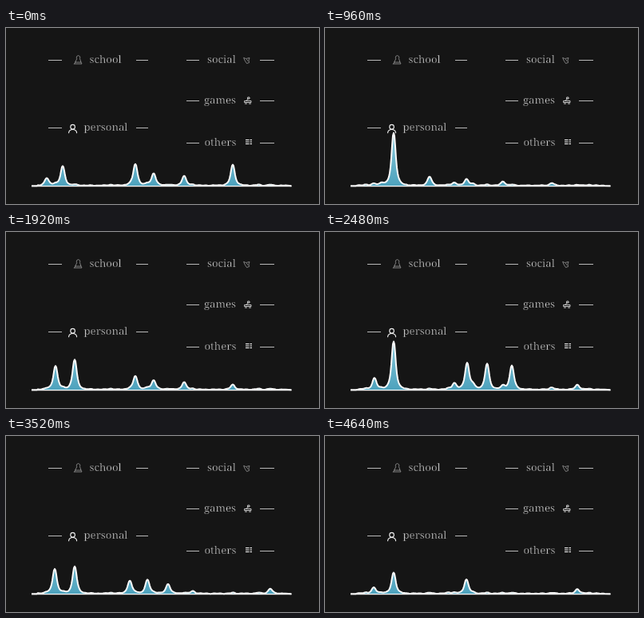
These frames come from a looping animation (392x221 px, 4.8 s). An HTML page with a canvas:

```html
<!DOCTYPE html>
<html lang="en">
<head>
<meta charset="utf-8">
<title>Menu with spectrum</title>
<style>
  html, body { margin: 0; width: 100%; height: 100%; overflow: hidden; background: #151515; }
  canvas { display: block; width: 100vw; height: 100vh; }
</style>
</head>
<body>
<canvas id="stage"></canvas>
<script>
const W = 392, H = 221, LOOP = 4800, STEP = 80, BASE = 198.3;
const BACK = '#151515';
const BASS = 86, ATTACK = 350, SUSTAIN = 160;
const canvas = document.getElementById('stage');
const ctx = canvas.getContext('2d');

// Ticks that repeat the previous picture, spread evenly over the loop.
const pauses = new Set(Array.from({ length: 14 }, (_, i) => Math.round(2 + i * 4.35)));

// Chords struck along the loop: position on the axis -> loudness.
const chords = [
  { at: 0, notes: { 51: 9, 71: 24, 162: 27, 185: 15, 223: 12, 284: 26 } },
  { at: 800, notes: { [BASS]: 66, 131: 11, 177: 7, 223: 5 } },
  { at: 1920, notes: { 62: 37, 162: 22, 185: 15, 223: 12, 284: 8 } },
  { at: 2480, notes: { [BASS]: 60, 178: 32, 203: 32, 234: 30, 316: 6 } },
  { at: 3520, notes: { 61: 30, 155: 16, 177: 14, 203: 12, 331: 6 } },
  { at: 4080, notes: { 61: 18, [BASS]: 34, 177: 48, 316: 16 } }
];
const pitches = [...new Set(chords.flatMap(c => Object.keys(c.notes)))].map(Number);

function envelope(age, decay) {
  if (age < 0) return Math.max(0, 1 + age / ATTACK);
  return Math.exp(-Math.max(0, age - SUSTAIN) / decay);
}

function loudness(pitch, t) {
  const decay = pitch === BASS ? 1550 : 380;
  const levels = chords.map(c => (c.notes[pitch] || 0) * envelope(t - c.at, decay));
  return Math.max(1, ...levels);
}

function line(x1, y1, x2, y2) {
  ctx.beginPath();
  ctx.moveTo(x1, y1);
  ctx.lineTo(x2, y2);
  ctx.stroke();
}

function shape(d, x, y) {
  ctx.save();
  ctx.translate(x, y);
  ctx.stroke(new Path2D(d));
  ctx.restore();
}

const LEFT = [53, 70, 163, 178];
const RIGHT = [226, 242, 318, 336];
const items = [
  { text: 'school', x: 104.5, y: 40.5, rules: LEFT },
  { text: 'personal', x: 97.5, y: 125.5, rules: LEFT },
  { text: 'social', x: 252, y: 40.5, rules: RIGHT },
  { text: 'games', x: 248, y: 91.5, rules: RIGHT },
  { text: 'others', x: 248.5, y: 144.5, rules: RIGHT }
];

function drawMenu() {
  ctx.font = '100 13.2px "Noto Serif", serif';
  ctx.lineJoin = 'round';
  for (const { text, x, y, rules: [a, b, c, d] } of items) {
    ctx.fillStyle = '#dcdcdc';
    ctx.fillText(text, x, y + 3.5);
    // Shave the outline to get hairline letters.
    ctx.strokeStyle = BACK;
    ctx.lineWidth = 0.36;
    ctx.strokeText(text, x, y + 3.5);
    ctx.strokeStyle = '#b8b8b8';
    ctx.lineWidth = 1;
    line(a, y, b, y);
    line(c, y, d, y);
  }
}

function drawIcons() {
  ctx.lineCap = 'round';
  ctx.lineWidth = 0.7;
  ctx.strokeStyle = '#aaa';
  shape('M-2 -1a2.3 2.6 0 1 1 4 0L3.5 3.5H-3.5ZM-5 5.5H4.5L3.5 3.5M-5 5.5L-3.5 3.5', 90.5, 39.5);
  shape('M-3.5 -3L-1 -2L3.5 -3L2.5 0L3 3L0 4L-2 1ZM0 -1L1.5 1', 301.5, 40.5);
  ctx.strokeStyle = '#ddd';
  ctx.lineWidth = 0.9;
  shape('M0 -4.5h2v2h-2zM0 -2.5L-2 0M-4 0H4V2H-4ZM-3.5 3.5h2M1.5 3.5h2', 303, 91.5);

  ctx.strokeStyle = '#f2f2f2';
  ctx.lineWidth = 1.1;
  ctx.beginPath();
  ctx.arc(83.6, 124.2, 2.8, 0, Math.PI * 2);
  ctx.stroke();
  shape('M-5 4.2C-4.5 -1.3 4.5 -1.3 5 4.2', 83.6, 127.4);

  ctx.lineCap = 'butt';
  for (let y = 140.5; y < 147; y += 2.5) {
    line(300, y, 304.5, y);
    line(305.5, y, 308, y);
  }
}

function drawSpectrum(t) {
  const peaks = pitches.map(x => ({ x, h: loudness(x, t) }));
  const heightAt = x => {
    const ripple = 0.5 + 0.4 * Math.sin(x * 0.55 + t / 300) * Math.sin(x * 0.19);
    return peaks.reduce((sum, p) => sum + p.h / (1 + Math.abs((x - p.x) / 3.1) ** 2.5), ripple);
  };
  const curve = new Path2D();
  curve.moveTo(32, BASE);
  curve.lineTo(38.5, BASE);
  for (let x = 40; x <= 350; x++) curve.lineTo(x, BASE - heightAt(x));
  curve.lineTo(357.5, BASE);

  const area = new Path2D(curve);
  area.closePath();
  const tint = ctx.createLinearGradient(0, 130, 0, 199);
  tint.addColorStop(0, '#8ccbdc');
  tint.addColorStop(1, '#4da2bd');
  ctx.fillStyle = tint;
  ctx.fill(area);

  ctx.strokeStyle = '#fafafa';
  ctx.lineWidth = 1.3;
  line(32, BASE + 0.3, 357.5, BASE + 0.3);
  ctx.lineWidth = 2;
  ctx.stroke(curve);
}

function resize() {
  const ratio = window.devicePixelRatio || 1;
  canvas.width = Math.round(innerWidth * ratio);
  canvas.height = Math.round(innerHeight * ratio);
}

function frame() {
  let tick = Math.floor(performance.now() % LOOP / STEP);
  if (pauses.has(tick)) tick--;
  ctx.setTransform(canvas.width / W, 0, 0, canvas.height / H, 0, 0);
  ctx.fillStyle = BACK;
  ctx.fillRect(0, 0, W, H);
  drawMenu();
  drawIcons();
  drawSpectrum(tick * STEP);
  requestAnimationFrame(frame);
}

addEventListener('resize', resize);
resize();
frame();
</script>
</body>
</html>
```
